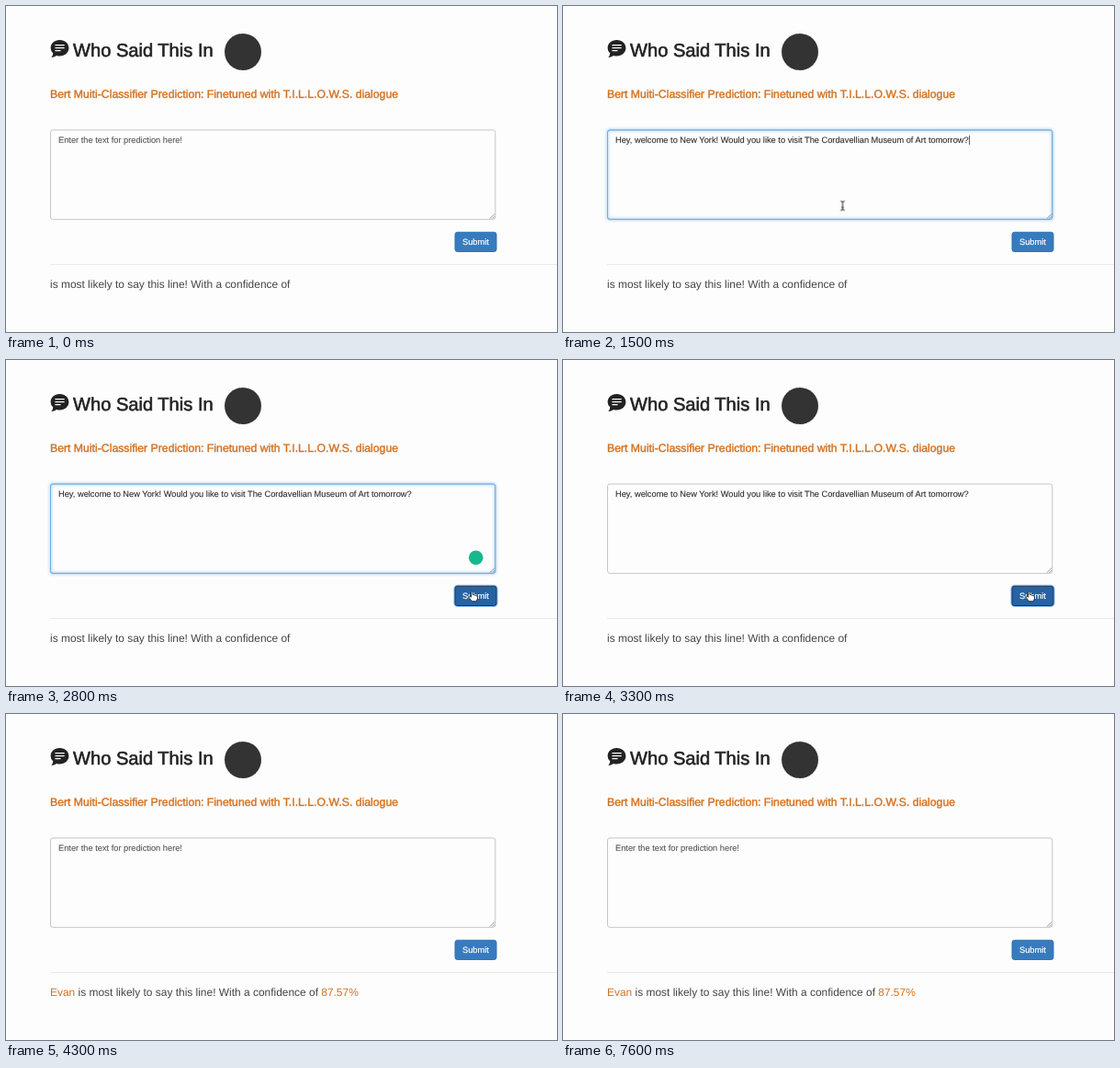
An HTML page that plays this animation: 600 px wide and 355 px high, repeating every 7.7 s.

```html
<!DOCTYPE html>
<html lang="en">
<head>
<meta charset="utf-8">
<title>Who Said This</title>
<style>
  html, body { margin: 0; width: 100%; height: 100%; overflow: hidden; background: #fdfdfe; }
  svg { display: block; width: 600px; height: 355px; }
  text {
    font-family: "Liberation Sans", Arial, sans-serif;
    text-rendering: geometricPrecision;
    fill: #2b2b2b;
    white-space: pre;
  }
  .title { font-size: 20.1px; fill: #222; stroke: #222; stroke-width: .6px; }
  .subtitle { font-size: 12.26px; fill: #d4711f; stroke: #d4711f; stroke-width: .4px; }
  .small { font-size: 9.28px; stroke: #2b2b2b; stroke-width: .1px; }
  .hint { fill: #555; stroke: #555; }
  .label { fill: #fff; stroke: #fff; stroke-width: .2px; }
  .result { font-size: 11.95px; fill: #444; }
  .accent { fill: #d4711f; }

  /* One loop is 7700 ms, so 1% is 77 ms. */
  .show, #button { animation: 7.7s step-end infinite; }
  .show { opacity: 0; }
  #before { animation-name: before; }
  #after { animation-name: after; }
  #hint { animation-name: hint; }
  #typed { animation-name: typed; }
  #hintCaret { animation-name: hint-caret; }
  #caret { animation-name: caret; }
  #badge { animation-name: badge; }
  #ibeam { animation-name: ibeam; }
  #arrow { animation-name: arrow; }
  #hand { animation-name: hand; }
  #buttonRing { animation-name: button-ring; }
  #button { fill: #377bbf; stroke: #3373b5; animation-name: button; }
  #focus { opacity: 0; animation: focus 7.7s linear infinite; }
  #cursor { animation: travel 7.7s ease-in-out infinite; }

  @keyframes before { 0% { opacity: 1 } 48.04%, 100% { opacity: 0 } }
  @keyframes after { 0% { opacity: 0 } 48.04%, 100% { opacity: 1 } }
  @keyframes hint { 0% { opacity: 1 } 16.88% { opacity: 0 } 48.04%, 100% { opacity: 1 } }
  @keyframes typed { 0% { opacity: 0 } 16.88% { opacity: 1 } 48.04%, 100% { opacity: 0 } }
  @keyframes hint-caret { 0% { opacity: 0 } 14.28% { opacity: 1 } 16.88%, 100% { opacity: 0 } }
  @keyframes caret { 0% { opacity: 0 } 16.88% { opacity: 1 } 35.06%, 100% { opacity: 0 } }
  @keyframes badge { 0% { opacity: 0 } 22.07% { opacity: 1 } 37.66%, 100% { opacity: 0 } }
  @keyframes ibeam { 0% { opacity: 0 } 9.35% { opacity: 1 } 28.7%, 100% { opacity: 0 } }
  @keyframes arrow {
    0% { opacity: 0 } 6.49% { opacity: 1 } 9.35% { opacity: 0 }
    28.7% { opacity: 1 } 31.7% { opacity: 0 }
    49.9% { opacity: 1 } 55.83%, 100% { opacity: 0 }
  }
  @keyframes hand { 0% { opacity: 0 } 31.7% { opacity: 1 } 49.9%, 100% { opacity: 0 } }
  @keyframes button-ring { 0% { opacity: 0 } 35.06% { opacity: 1 } 48.04%, 100% { opacity: 0 } }
  @keyframes button {
    0% { fill: #377bbf; stroke: #3373b5 }
    31.7% { fill: #2762a3; stroke: #204d84 }
    35.06% { fill: #2762a3; stroke: #16365c }
    48.04% { fill: #2762a3; stroke: #204d84 }
    49.9%, 100% { fill: #377bbf; stroke: #3373b5 }
  }
  @keyframes focus {
    0%, 14.27% { opacity: 0 }
    16.2%, 36.37% { opacity: 1 }
    38.9%, 100% { opacity: 0 }
  }
  @keyframes travel {
    0%, 6.49% { transform: translate(400px, 256px) }
    11.68%, 24.67% { transform: translate(304.5px, 217.5px) }
    33.76%, 46.75% { transform: translate(509px, 257px) }
    55.83%, 100% { transform: translate(612px, 225px) }
  }
</style>
</head>
<body>
<svg viewBox="0 0 600 355">
  <defs>
    <filter id="glow" x="-5%" y="-15%" width="110%" height="130%">
      <feGaussianBlur stdDeviation="1.6"/>
    </filter>
    <rect id="box" x="48.5" y="135" width="484.3" height="97.3" rx="2.5"/>
  </defs>

  <!-- Heading -->
  <path fill="#222" d="M58.5 37C64.2 37 68.4 40.9 68.4 45.7S64.2 54.4 58.5 54.4Q56.6 54.4 55 53.9Q52.6 55.8 49.3 56.1Q51.2 54 51.3 51.6Q48.6 49.2 48.6 45.7C48.6 40.9 52.8 37 58.5 37Z"/>
  <path stroke="#fdfdfe" stroke-width="1.2" stroke-linecap="round" d="M53.9 42.7h9.3M53.9 45.7h9.3M53.9 48.7h5.2"/>
  <text class="title" x="73" y="55.3">Who Said This In</text>
  <circle cx="258" cy="50" r="20" fill="#333"/>
  <text class="subtitle" x="48" y="100.3">Bert Muiti-Classifier Prediction: Finetuned with T.I.L.L.O.W.S. dialogue</text>

  <!-- Text box -->
  <use href="#box" fill="#fdfdfe" stroke="#c3c5c9"/>
  <g id="focus" fill="none" stroke="#66afe9">
    <use href="#box" stroke-width="3" opacity=".4" filter="url(#glow)"/>
    <use href="#box"/>
  </g>
  <path stroke="#666" stroke-width=".7" d="M527 231.5l5-5M529.7 231.5l2.3-2.3"/>
  <text id="hint" class="small hint show" x="57" y="149.3">Enter the text for prediction here!</text>
  <text id="typed" class="small show" x="57" y="149.3">Hey, welcome to New York! Would you like to visit The Cordavellian Museum of Art tomorrow?</text>
  <path id="hintCaret" class="show" stroke="#222" stroke-width=".8" d="M57 141v10"/>
  <path id="caret" class="show" stroke="#222" stroke-width=".8" d="M442.6 141v10"/>
  <circle id="badge" class="show" cx="511.7" cy="215.2" r="7.8" fill="#15b98d"/>

  <!-- Button -->
  <rect id="buttonRing" class="show" x="488.2" y="245.5" width="46.6" height="22.8" rx="3.5" fill="none" stroke="#8dbdf0" stroke-width="1.6"/>
  <rect id="button" x="489" y="246.3" width="45" height="21.2" rx="2.5"/>
  <text class="small label" x="497" y="260.3">Submit</text>

  <!-- Result -->
  <path stroke="#e9e9eb" d="M48 281.5h552"/>
  <text id="before" class="result show" x="48" y="307.3">is most likely to say this line! With a confidence of</text>
  <text id="after" class="result show" x="48" y="307.3"><tspan class="accent">Evan</tspan> is most likely to say this line! With a confidence of <tspan class="accent">87.57%</tspan></text>

  <g id="cursor">
    <path id="ibeam" class="show" fill="none" stroke="#222" stroke-width="1" d="M-2.3 -5Q0 -5 0 -3.8Q0 -5 2.3 -5M0 -4V4M-2.3 5Q0 5 0 3.8Q0 5 2.3 5M-1.2 1.8h2.4"/>
    <path id="arrow" class="show" fill="#111" stroke="#fff" stroke-width=".7" d="M0 0V10.5L2.4 8.2L4.1 12L5.8 11.2L4.2 7.6H7.4Z"/>
    <path id="hand" class="show" fill="#fff" stroke="#111" stroke-width=".8" stroke-linejoin="round" d="M-2.4 1.2V-4Q-1.5 -5.6 -.6 -4V-1.2Q.6 -2 1.2 -.8Q2.4 -1.5 2.9 -.3Q4.3 -.7 4.4 .8V2.8L3.4 5.8H-1.7L-4.7 1.8Q-4.7 .2 -3.3 .6Z"/>
  </g>
</svg>
</body>
</html>
```
